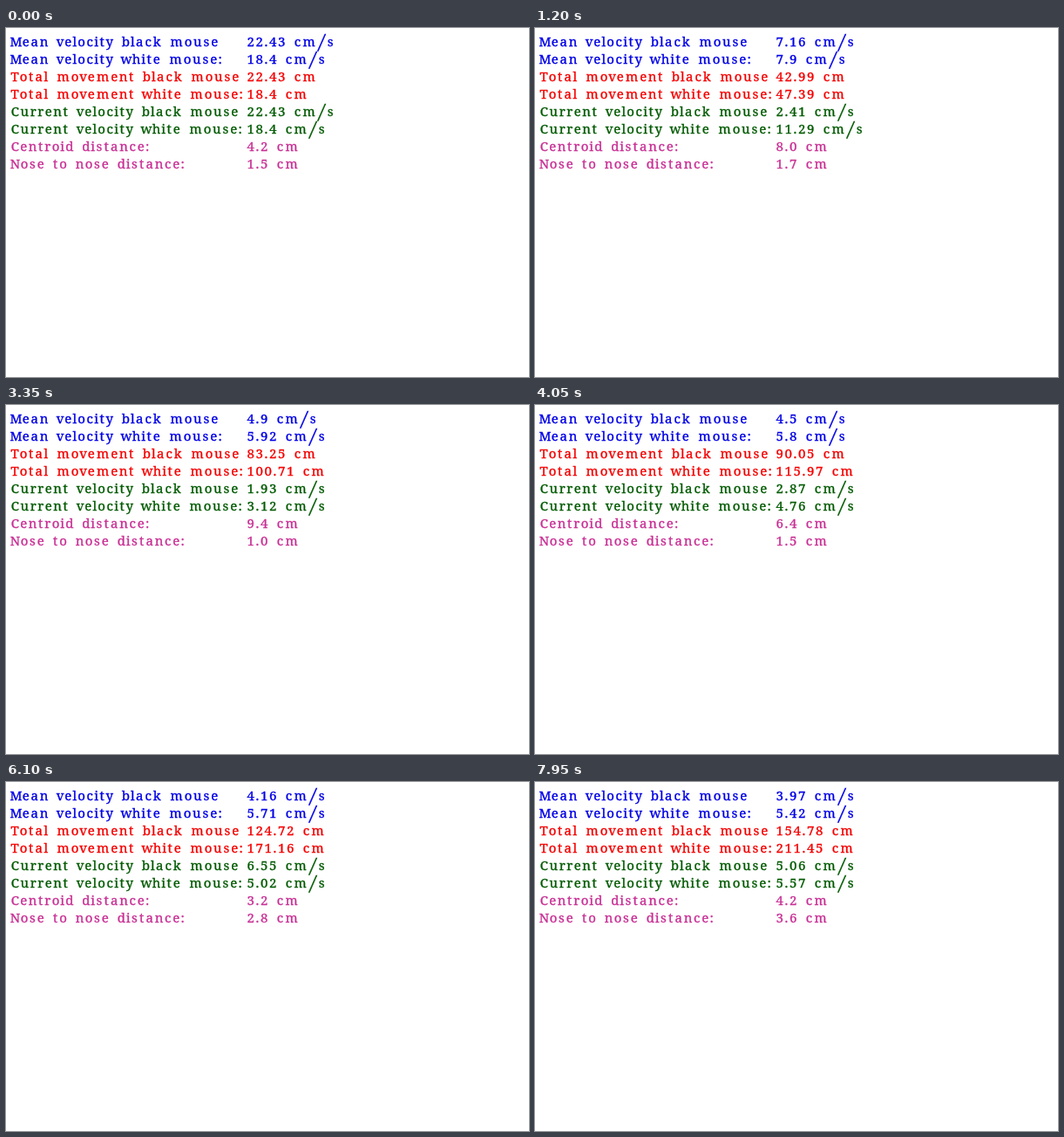
An HTML page that plays this animation: 600x400 px, repeating every 8 s.

```html
<!DOCTYPE html>
<html lang="en">
<head>
<meta charset="utf-8">
<title>Mouse tracking readout</title>
<style>
  html, body { margin: 0; width: 100%; height: 100%; overflow: hidden; background: #fff; }
  svg { display: block; width: 600px; height: 400px; }
  text { font: 15px "Noto Serif", "Liberation Serif", serif; text-anchor: middle; stroke-width: .35px; }
  .slash { font-size: 21px; font-style: italic; baseline-shift: -2.5px; }
</style>
</head>
<body>
<svg id="stage" viewBox="0 0 600 400" xmlns="http://www.w3.org/2000/svg"></svg>
<script>
const LOOP = 8000, TICK = 50, SECOND = 208;
const BLUE = '#0000e6', RED = '#f50000', GREEN = '#005a00', PINK = '#c83095';

const rows = [
  ['Mean velocity black mouse', BLUE],
  ['Mean velocity white mouse:', BLUE],
  ['Total movement black mouse', RED],
  ['Total movement white mouse:', RED],
  ['Current velocity black mouse', GREEN],
  ['Current velocity white mouse:', GREEN],
  ['Centroid distance:', PINK],
  ['Nose to nose distance:', PINK]
];

// Character advances in half pixels, grouped by width.
const advances = {
  11: 'il:.', 15: 't', 17: ' r', 18: 'vs', 19: 'ecy', 20: 'oT0123456789',
  21: 'abdkC', 22: 'nhN', 23: 'u/', 24: 'w', 26: 'M', 34: 'm'
};
const advance = {};
for (const units in advances)
  for (const c of advances[units]) advance[c] = units / 2;

function setText(el, str, left) {
  if (el.textContent === str) return;
  let x = left;
  const centres = [...str].map(c => {
    const mid = x + advance[c] / 2;
    x += advance[c];
    return mid.toFixed(2);
  });
  el.setAttribute('x', centres.join(' '));
  el.innerHTML = str.replace('/', '<tspan class="slash">/</tspan>');
}

function addText(row, color) {
  const el = document.createElementNS('http://www.w3.org/2000/svg', 'text');
  el.setAttribute('y', 20.7 + row * 20);
  el.setAttribute('fill', color);
  el.setAttribute('stroke', color);
  return stage.appendChild(el);
}

const stage = document.getElementById('stage');
const values = rows.map(([label, color], i) => {
  setText(addText(i, color), label, 5);
  return addText(i, color);
});

const rand = n => {
  const s = Math.sin(n * 127.1 + 11.7) * 43758.5453;
  return s - Math.floor(s);
};

// Distance walked per second, from known totals and the last step before each.
const marks = [1, 6, 11, 17, 23, 30, 39];
function track(totals, last, seed) {
  const total = [0, totals[0]], step = [0, totals[0]];
  for (let k = 1; k < marks.length; k++) {
    const from = marks[k - 1], count = marks[k] - from - 1;
    const weights = Array.from({ length: count }, (_, i) => .6 + .8 * rand(seed + from + i));
    const sum = weights.reduce((a, b) => a + b);
    const rest = totals[k] - totals[k - 1] - last[k];
    for (const d of [...weights.map(w => w / sum * rest), last[k]]) {
      step.push(d);
      total.push(total[total.length - 1] + d);
    }
  }
  return { total, step };
}
const black = track([22.43, 42.99, 65.87, 83.25, 98.36, 124.72, 154.78],
  [22.43, 2.41, 3.48, 1.93, 3.11, 6.55, 5.06], 3);
const white = track([18.4, 47.39, 74.26, 100.71, 130.23, 171.16, 211.45],
  [18.4, 11.29, 4.95, 3.12, 3.79, 5.02, 5.57], 71);

// Distances drift between known readings with a little jitter.
const times = [0, 1200, 2250, 3350, 4750, 6100, 7950];
const centroid = [4.2, 8, 6, 9.4, 3.4, 3.2, 4.2];
const nose = [1.5, 1.7, 2.9, 1, 2.3, 2.8, 3.6];
function drift(points, t, seed) {
  let k = 0;
  while (k < times.length - 2 && t >= times[k + 1]) k++;
  const u = (t - times[k]) / (times[k + 1] - times[k]);
  const jitter = Math.sin(Math.PI * u) * (rand(t / TICK + seed) - .5) * .8;
  return points[k] + (points[k + 1] - points[k]) * u + jitter;
}

// Two decimals without trailing zeros; exact halves round down.
const short = v => String(Number((v - 1e-6).toFixed(2)));

function render(time) {
  const t = Math.floor(time % LOOP / TICK) * TICK;
  const n = 1 + Math.floor(t / SECOND);
  const readout = [
    short(black.total[n] / n) + ' cm/s',
    short(white.total[n] / n) + ' cm/s',
    short(black.total[n]) + ' cm',
    short(white.total[n]) + ' cm',
    short(black.step[n]) + ' cm/s',
    short(white.step[n]) + ' cm/s',
    drift(centroid, t, 5).toFixed(1) + ' cm',
    drift(nose, t, 400).toFixed(1) + ' cm'
  ];
  readout.forEach((str, i) => setText(values[i], str, 275.7));
}

const start = performance.now();
function loop() {
  render(performance.now() - start);
  requestAnimationFrame(loop);
}
loop();
</script>
</body>
</html>
```
